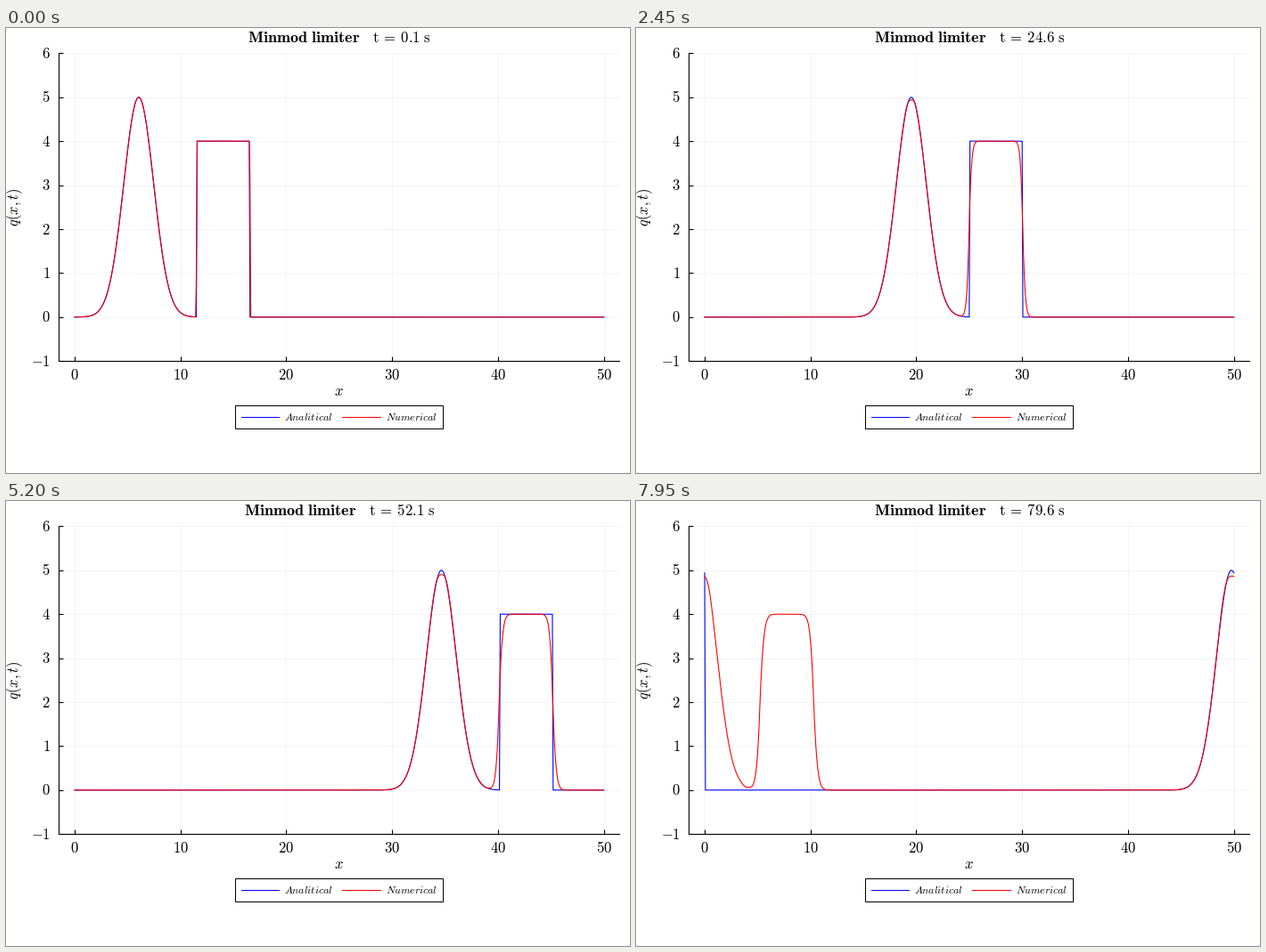
A matplotlib script that plays this animation: 700x500 px, repeating every 8 s.

```python
import numpy as np
import matplotlib.pyplot as plt
from matplotlib.animation import FuncAnimation
from matplotlib.patches import Rectangle

W, H, DPI = 700, 500, 100
FRAMES, INTERVAL = 160, 50
CELLS, LENGTH = 700, 50
SPEED, DT, SKIP = 0.55, 0.1, 5
CFL = SPEED * DT * CELLS / LENGTH
PT = 72 / DPI

plt.rcParams["mathtext.fontset"] = "cm"

x = np.linspace(0, LENGTH, CELLS + 1)


def profile(s):
    bump = 5 * np.exp(-(s - 6) ** 2 / 4)
    block = 4.0 * ((s > 11.5 - 1e-9) & (s < 16.5 + 1e-9))
    return bump + block


def exact(t):
    q = profile(x - SPEED * t)
    q[0] = q[-1]
    return q


def minmod(a, b):
    return np.where(a * b > 0, np.sign(a) * np.minimum(abs(a), abs(b)), 0)


def step(q):
    d = np.roll(q, -1) - q
    flux = q + 0.5 * (1 - CFL) * minmod(d, np.roll(d, 1))
    return q - CFL * (flux - np.roll(flux, 1))


def solve():
    q = step(profile(x[:-1]))
    states = []
    for _ in range(FRAMES):
        states.append(np.append(q, q[0]))
        for _ in range(SKIP):
            q = step(q)
    return states


numeric = solve()

fig = plt.figure(figsize=(W / DPI, H / DPI), dpi=DPI, facecolor="white")
left, right, top, bottom = 59.2, 688.4, 28.4, 374.2
ax = fig.add_axes([left / W, 1 - bottom / H, (right - left) / W, (bottom - top) / H])
ax.set_xlim(-1.5, 51.5)
ax.set_ylim(-1, 6)
ax.set_xticks(range(0, 51, 10))
ax.set_yticks(range(-1, 7))
ax.tick_params(direction="in", length=5 * PT, width=1.1 * PT,
               labelbottom=False, labelleft=False)
ax.grid(color="black", alpha=0.06, lw=0.7 * PT)
ax.set_axisbelow(True)
for side in ("top", "right"):
    ax.spines[side].set_visible(False)
for side in ("left", "bottom"):
    ax.spines[side].set_linewidth(1.1 * PT)


def label(px, py, text, size=12, **kw):
    kw = {"ha": "center", "va": "baseline", **kw}
    return fig.text(px / W, 1 - py / H, text, fontsize=size, **kw)


def stroke(x0, x1, py, color):
    fig.add_artist(plt.Line2D([x0 / W, x1 / W], [1 - py / H] * 2,
                              color=color, lw=PT))


for v in range(0, 51, 10):
    label(left + (v + 1.5) * (right - left) / 53, 395, f"${v}$")
for v in range(-1, 7):
    label(50, bottom - (v + 1) * (bottom - top) / 7 + 5.5, f"${v}$", ha="right")
label(373.5, 413, "$x$")
label(21, 201.5, "$q(x,t)$", rotation=90, va="center", ha="right")

fig.add_artist(Rectangle((257 / W, 1 - 450 / H), 233 / W, 26 / H,
                         fc="white", ec="black", lw=PT))
stroke(263.5, 306, 436.8, "blue")
stroke(377, 419.5, 436.8, "red")
label(312, 441, "$Analitical$", 8.5, ha="left")
label(426, 441, "$Numerical$", 8.5, ha="left")

name = label(0, 16.5, r"$\mathbf{Minmod\ limiter}$", 13)
clock = label(0, 16.5, "", ha="left")
blue, = ax.plot([], [], color="blue", lw=1.1 * PT)
red, = ax.plot([], [], color="red", lw=1.1 * PT)


def draw(i):
    t = 0.1 + i * SKIP * DT
    digits = f"{t:.1f}"
    # each digit adds half an em, which moves the centred title by a quarter
    shift = 4.2 * (len(digits) - 3)
    name.set_x((334 - shift) / W)
    clock.set_x((411 - shift) / W)
    clock.set_text(rf"$\mathrm{{t}}\:=\:\mathrm{{{digits}\ s}}$")
    blue.set_data(x, exact(t))
    red.set_data(x, numeric[i])
    return name, clock, blue, red


anim = FuncAnimation(fig, draw, frames=FRAMES, interval=INTERVAL, repeat=True)
plt.show()
```
